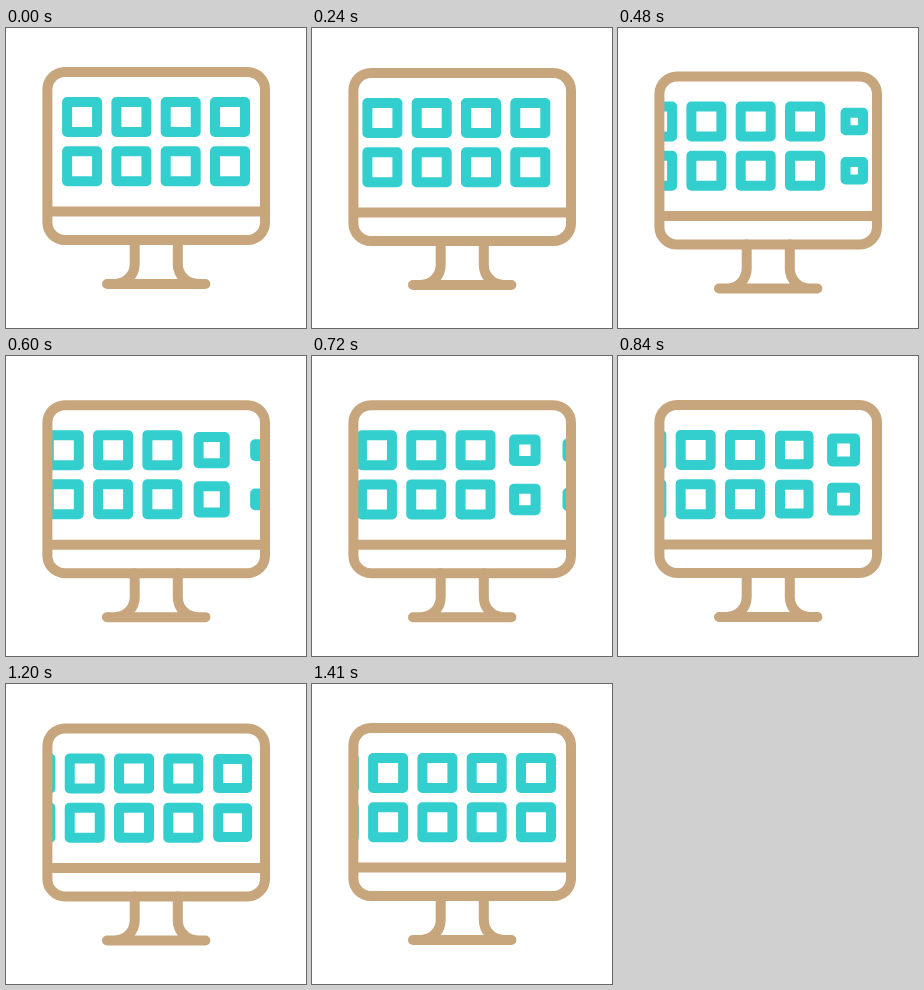
These frames come from a looping animation (300x300 px, 1.5 s). An HTML page:

```html
<!DOCTYPE html>
<html lang="en">
<head>
<meta charset="utf-8">
<title>Monitor</title>
<style>
  html, body { margin: 0; width: 100%; height: 100%; overflow: hidden; background: #fff; }
  svg { display: block; width: 100%; height: 100%; }
  #tiles, #frame { fill: none; stroke-width: 10; stroke-linejoin: round; }
  #tiles { stroke: #32cfce; }
  #frame { stroke: #c7a67d; stroke-linecap: round; }
</style>
</head>
<body>
<svg viewBox="0 0 300 300">
  <clipPath id="screen"><rect x="42" y="45" width="216" height="138"/></clipPath>
  <g id="monitor">
    <g clip-path="url(#screen)"><path id="tiles"/></g>
    <g id="frame">
      <rect x="41.4" y="44" width="217.6" height="168" rx="17.5"/>
      <path d="M42 183.5H258.5"/>
      <path d="M128.7 212V236A20 20 0 0 1 108.7 256M171.8 212V236A20 20 0 0 0 191.8 256M101 256H199.4"/>
    </g>
  </g>
</svg>
<script>
const LOOP = 1500, STEP = 30, MOVE = 1380;
const PITCH = 49.3, SIDE = 30, BOB = 5.2, GROW = 560;
const ROWS = [89, 138.2];
// Start times of growth for the four incoming columns
const STARTS = [170, 360, 460, 710];

const monitor = document.getElementById('monitor');
const tiles = document.getElementById('tiles');

const clamp = x => Math.min(1, Math.max(0, x));

function ease(x, p = 2.7) {
  x = clamp(x);
  const k = 2 ** (p - 1);
  return x < 0.5 ? k * x ** p : 1 - k * (1 - x) ** p;
}

const grow = x => (1 - Math.cos(Math.PI * clamp(x))) / 2;

function square(cx, cy, s) {
  return `M${cx - s / 2} ${cy - s / 2}h${s}v${s}h${-s}z`;
}

function draw(ms) {
  const t = ms < 2 * STEP ? 0 : Math.min(1410, Math.floor(ms / STEP) * STEP);
  const half = MOVE / 2;
  const bob = BOB * (t < half ? ease(t / half) : 1 - ease((t - half) / half));
  const shift = 4 * PITCH * ease(t / MOVE);

  let d = '';
  for (let col = 0; col < 8; col++) {
    const scale = col < 4 ? 1 : grow((t - STARTS[col - 4]) / GROW);
    if (!scale) continue;
    const x = 76.1 + col * PITCH - shift;
    for (const y of ROWS) d += square(x, y, SIDE * scale);
  }
  tiles.setAttribute('d', d);
  monitor.setAttribute('transform', `translate(0 ${bob})`);
}

const begin = performance.now();
function tick() {
  draw((performance.now() - begin) % LOOP);
  requestAnimationFrame(tick);
}
tick();
</script>
</body>
</html>
```
